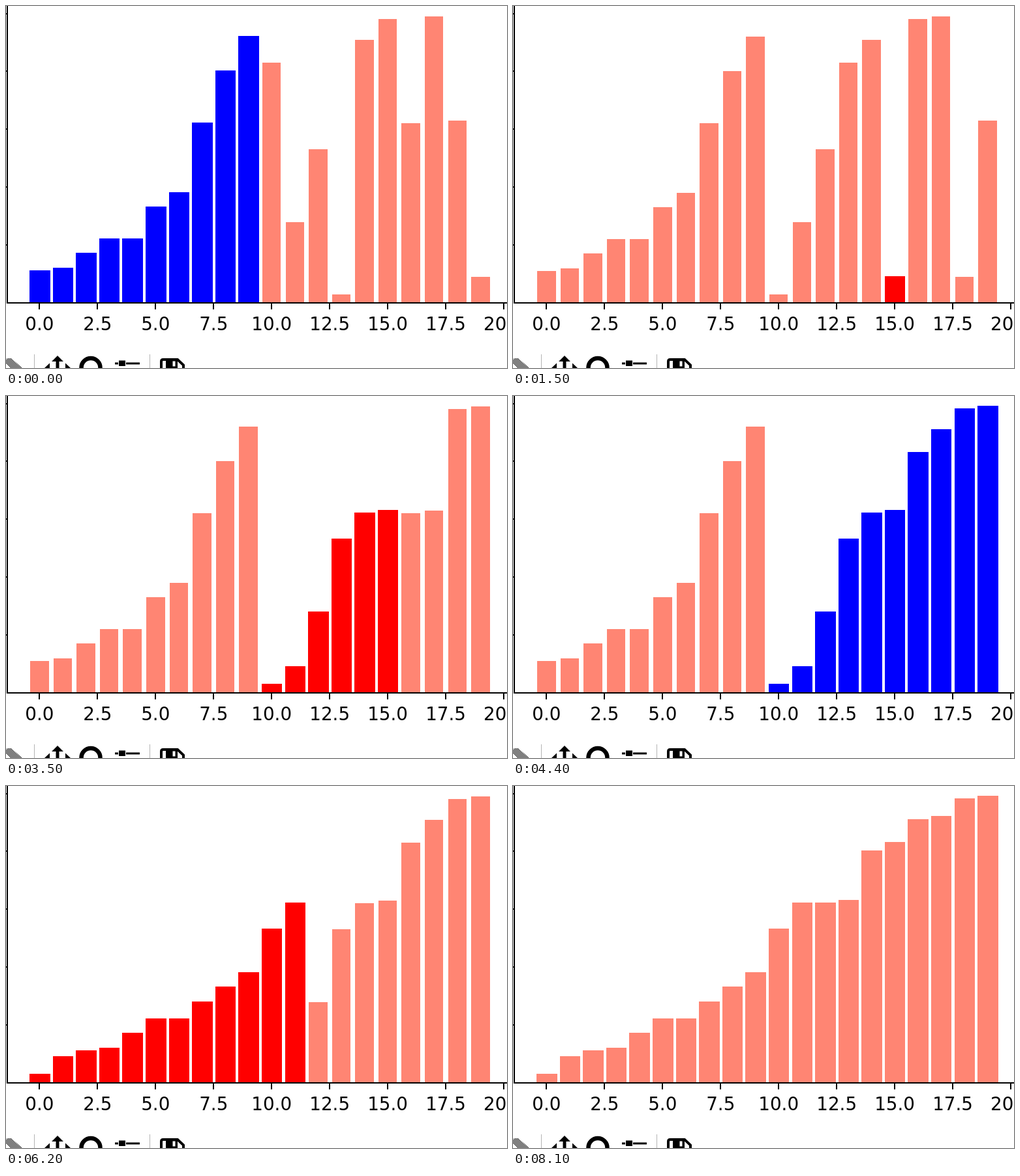
Write an HTML page that moves like this. It is 768 by 556 pixels and loops after 8.3 s.

```html
<!DOCTYPE html>
<html lang="en">
<head>
<meta charset="utf-8">
<title>Merge sort</title>
<style>
  html, body { margin: 0; width: 100%; height: 100%; overflow: hidden; background: #fff; }
  svg { display: block; }
  text { font: 27.78px "DejaVu Sans", sans-serif; text-anchor: middle; }
</style>
</head>
<body>
<svg id="stage" width="768" height="556" viewBox="0 0 768 556">
  <defs>
    <pattern id="stipple" width="2" height="2" patternUnits="userSpaceOnUse">
      <path d="M0 0h1v1h-1zM1 1h1v1h-1z" shape-rendering="crispEdges"/>
    </pattern>
  </defs>
  <g id="bars" shape-rendering="crispEdges"></g>
  <g id="axes" shape-rendering="crispEdges">
    <rect x="1" y="0" width="2" height="457"/>
    <rect x="1" y="455" width="767" height="2"/>
  </g>
  <g id="labels"></g>
  <g id="toolbar">
    <path d="M2 541H8L25 556H7L0 549V543Z" fill="url(#stipple)"/>
    <path d="M43.5 535V556M220.5 535V556" stroke="#b4b4b4"/>
    <path d="M79 537L88 546H81.5V556H76.5V546H70ZM59 556L67 548.5V556ZM99 556L91 548.5V556Z"/>
    <circle cx="130" cy="555.5" r="14.5" fill="none" stroke="#000" stroke-width="6.5"/>
    <path d="M167 547.5H172V550.5H167ZM173 544.5H183V553H173ZM184 547.5H205V550.5H184Z"/>
    <path d="M238 558V546Q238 543 241 543H263L272 551.5V558" fill="none" stroke="#000" stroke-width="4"/>
    <path d="M245 543H263V556H245Z"/>
    <path d="M255.5 545.5H259.5V553.5H255.5Z" fill="#fff"/>
  </g>
</svg>
<script>
const LOOP = 8300, BASE = 456, UNIT = 4.445, X0 = 51.4, STEP = 35.58;
const SALMON = '#ff8573', RED = '#f00', BLUE = '#00f';
const data = [11, 12, 17, 22, 22, 33, 38, 62, 80, 92, 83, 28, 53, 3, 91, 98, 62, 99, 63, 9];

function add(parent, tag, attrs) {
  const el = document.createElementNS('http://www.w3.org/2000/svg', tag);
  return document.getElementById(parent).appendChild(set(el, attrs));
}
function set(el, attrs) {
  for (const name in attrs) el.setAttribute(name, attrs[name]);
  return el;
}

// Axis ticks and labels
for (let v = 0; v <= 20; v += 2.5) {
  const x = X0 + v * STEP;
  add('axes', 'rect', { x: Math.round(x) - 1, y: 457, width: 2, height: 9 });
  add('labels', 'text', { x, y: 498 }).textContent = v.toFixed(1);
}
for (let v = 20; v <= 100; v += 20)
  add('axes', 'rect', { x: 0, y: Math.round(BASE - v * UNIT) - 1, width: 2, height: 2 });

// Sort once, keeping the array after every write
const history = {};
function sort(a, lo, hi) {
  if (lo >= hi) return;
  const mid = (lo + hi) >> 1;
  sort(a, lo, mid);
  sort(a, mid + 1, hi);
  const left = a.slice(lo, mid + 1), right = a.slice(mid + 1, hi + 1);
  for (let k = lo; k <= hi; k++) {
    const takeLeft = !right.length || (left.length && left[0] <= right[0]);
    a[k] = takeLeft ? left.shift() : right.shift();
    history[[lo, hi, k - lo + 1]] = a.slice();
  }
}
sort(data.slice(), 0, data.length - 1);

// Timeline of drawn states
const shots = [];
function show(at, lo, hi, count, color) {
  shots.push({ at, lo, count, color, values: history[[lo, hi, count]] });
}
function writes(at, lo, hi, from, to = from) {
  for (let k = from; k <= to; k++) show(at + (k - from) * 100, lo, hi, k, RED);
}
function finish(at, lo, hi, color = BLUE) {
  show(at, lo, hi, hi - lo + 1, color);
}

finish(0, 0, 9);
writes(100, 10, 11, 1);
writes(200, 10, 14, 4);
writes(300, 15, 17, 2);
writes(400, 18, 19, 1);
finish(1000, 18, 19);

writes(1500, 15, 19, 1);
writes(1700, 15, 19, 3, 4);
finish(2300, 15, 19);

writes(2900, 10, 19, 1);
writes(3100, 10, 19, 2, 6);
writes(3700, 10, 19, 7, 9);
finish(4400, 10, 19);
finish(5000, 10, 19, SALMON);

writes(5100, 0, 19, 1, 2);
writes(5300, 0, 19, 4);
writes(5500, 0, 19, 5);
writes(5700, 0, 19, 7, 17);
writes(6900, 0, 19, 18, 19);
finish(7500, 0, 19);
finish(8100, 0, 19, SALMON);

const bars = data.map(() => add('bars', 'rect', {}));

function draw(shot) {
  bars.forEach((bar, i) => {
    const marked = i >= shot.lo && i < shot.lo + shot.count;
    const edge = marked ? 1 : 0; // marked bars also get an outline
    const mid = X0 + i * STEP, half = STEP * 0.4;
    const x = Math.round(mid - half) - edge;
    const y = Math.round(BASE - shot.values[i] * UNIT) - edge;
    set(bar, {
      x, y,
      width: Math.round(mid + half) + 2 * edge - x,
      height: BASE - y,
      fill: marked ? shot.color : SALMON
    });
  });
}

let current;
function tick() {
  const t = performance.now() % LOOP;
  const shot = shots.findLast(s => s.at <= t);
  if (shot !== current) draw(current = shot);
  requestAnimationFrame(tick);
}
tick();
</script>
</body>
</html>
```
